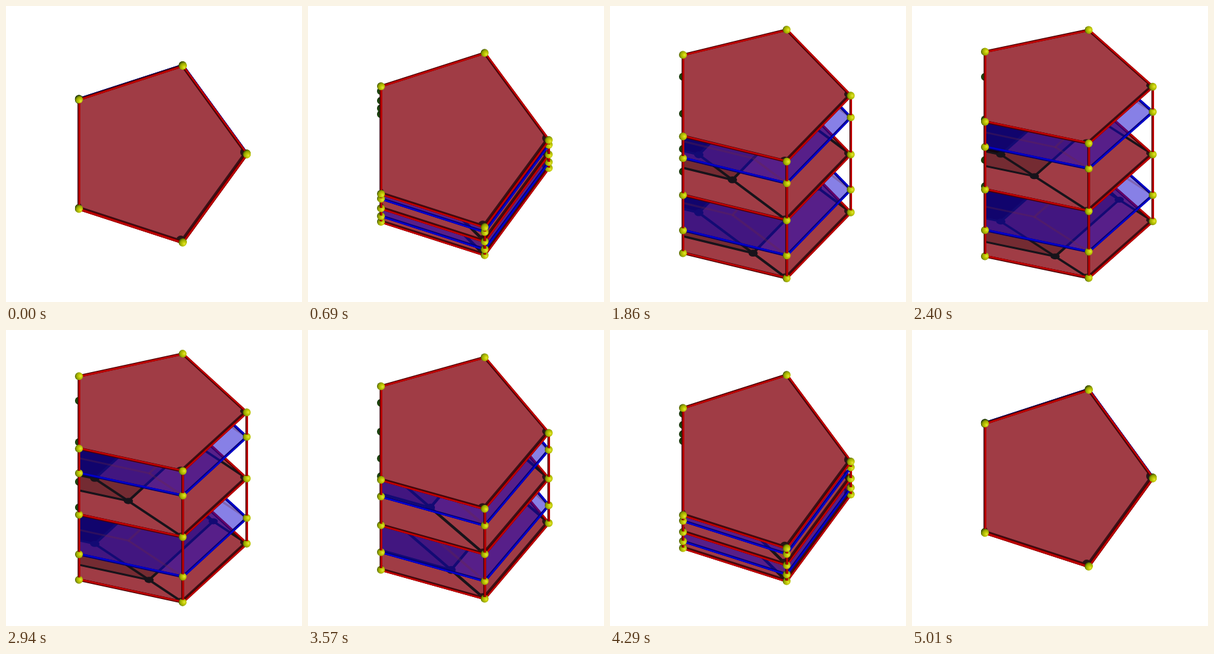
Write an HTML page with a canvas that moves like this. It is 450 px wide and 450 px high and loops after 5.04 s.

```html
<!DOCTYPE html>
<html lang="en">
<head>
<meta charset="utf-8">
<title>Tilting pentagonal prism</title>
<style>
  html, body { margin: 0; width: 100%; height: 100%; overflow: hidden; background: #fff; }
  canvas { display: block; }
</style>
</head>
<body>
<canvas id="stage" width="450" height="450"></canvas>
<script>
const ctx = document.getElementById('stage').getContext('2d');
const MID = 225, R = 141, H = 133.5, BALL = 6;
const FRAME = 30, COUNT = 168, HOLD = 12, RAMP = 60;
const MAX_TILT = 50 * Math.PI / 180;
const SHADOW = '#17131a';

// From bottom to top; dy is a small offset on the screen.
const levels = [
  { z: -1, red: true, dy: 0 },
  { z: -0.618, red: false, dy: -0.8 },
  { z: 0, red: true, dy: 0.7 },
  { z: 0.618, red: false, dy: -0.8 },
  { z: 1, red: true, dy: 0 }
];

// Back corners come first, so front posts are painted over them.
const corners = [0, 1, 2, 3, 4]
  .map(i => ({ x: R * Math.cos(i * 0.4 * Math.PI), y: R * Math.sin(i * 0.4 * Math.PI) }));
const backFirst = [4, 3, 0, 2, 1];
const BACK_LEFT = 3;

let cos = 1, sin = 0;

const clamp = v => Math.max(0, Math.min(1, v));
const levelY = l => MID - l.z * H * sin + l.dy;
const project = (c, l) => ({ x: MID + c.x, y: levelY(l) + c.y * cos });
const gap = (i, n) => (levels[i + n].z - levels[i].z) * H;

function tracePentagon(shift) {
  ctx.beginPath();
  corners.forEach(c => ctx.lineTo(c.x - shift, c.y - shift));
  ctx.closePath();
}

function fillPentagon(shift, color) {
  tracePentagon(shift);
  ctx.fillStyle = color;
  ctx.fill();
}

function strokePentagon(shift, color, width) {
  tracePentagon(shift);
  ctx.strokeStyle = color;
  ctx.lineWidth = width;
  ctx.stroke();
}

// Light comes from (1, 1, 1), so a point at height h casts to (-h, -h).
function dots(shift, color) {
  ctx.fillStyle = color;
  for (const c of corners) {
    ctx.beginPath();
    ctx.arc(c.x - shift, c.y - shift, BALL + 1, 0, 2 * Math.PI);
    ctx.fill();
  }
}

function postShadows(length, color, width) {
  ctx.strokeStyle = color;
  ctx.lineWidth = width;
  ctx.beginPath();
  for (const c of corners) {
    ctx.moveTo(c.x, c.y);
    ctx.lineTo(c.x - length, c.y - length);
  }
  ctx.stroke();
}

function drawPlane(i) {
  const level = levels[i];
  ctx.save();
  ctx.setTransform(1, 0, 0, cos, MID, levelY(level));
  fillPentagon(0, level.red ? '#a03c45' : 'rgba(16, 2, 206, 0.5)');
  tracePentagon(0);
  ctx.clip();
  if (level.red) {
    if (i < 4) {
      const near = gap(i, 1), far = gap(i, 2);
      fillPentagon(near, 'rgba(0, 0, 0, 0.28)');
      fillPentagon(far, 'rgba(8, 4, 8, 0.9)');
      strokePentagon(near, SHADOW, 4.5);
      strokePentagon(far, SHADOW, 4.5);
      postShadows(far, SHADOW, 4.5);
      dots(near, SHADOW);
      dots(far, SHADOW);
    }
    strokePentagon(2, '#3a1016', 4);
    dots(3, '#2a1418');
  } else {
    const above = gap(i, 1), faint = 'rgba(110, 40, 60, 0.3)';
    strokePentagon(above, faint, 4);
    postShadows(above, faint, 4);
  }
  ctx.restore();
}

function line(a, b, color, width) {
  ctx.strokeStyle = color;
  ctx.lineWidth = width;
  ctx.beginPath();
  ctx.moveTo(a.x, a.y);
  ctx.lineTo(b.x, b.y);
  ctx.stroke();
}

function tube(a, b, red) {
  const len = Math.hypot(b.x - a.x, b.y - a.y);
  if (len < 0.5) return;
  let nx = (a.y - b.y) / len, ny = (b.x - a.x) / len;
  const side = nx + ny * (cos - sin) < 0 ? -0.7 : 0.7;
  nx *= side;
  ny *= side;
  line(a, b, red ? '#4a0004' : '#00006e', 4);
  line({ x: a.x + nx, y: a.y + ny }, { x: b.x + nx, y: b.y + ny }, red ? '#c00000' : '#0000cd', 2.6);
}

function ball(p, dark) {
  const lx = 0.577 * BALL, ly = 0.577 * (cos - sin) * BALL;
  const g = ctx.createRadialGradient(
    p.x + lx * 0.75, p.y + ly * 0.75, 0,
    p.x + lx * 0.5, p.y + ly * 0.5, BALL * 1.5);
  const stops = dark
    ? ['#2c6416', '#265a12', '#1c480e', '#0c2406']
    : ['#e2e63c', '#c4cc04', '#94a400', '#1e3400'];
  stops.forEach((s, i) => g.addColorStop([0, 0.3, 0.65, 1][i], s));
  ctx.fillStyle = g;
  ctx.beginPath();
  ctx.arc(p.x, p.y, BALL, 0, 2 * Math.PI);
  ctx.fill();
}

function drawLevel(i) {
  const level = levels[i];
  const points = corners.map(c => project(c, level));
  drawPlane(i);
  points.forEach((p, k) => tube(p, points[(k + 1) % 5], level.red));
  for (const k of backFirst) {
    ball(points[k], k === BACK_LEFT && i < 4);
    if (i < 4) {
      const p = points[k];
      tube({ x: p.x, y: p.y - (BALL - 1) * sin }, project(corners[k], levels[i + 1]), true);
    }
  }
}

function tiltAt(ms) {
  const half = COUNT / 2;
  const frame = Math.floor(ms / FRAME) % COUNT;
  const fromStart = half - Math.abs(frame - half);
  return MAX_TILT * clamp((fromStart - HOLD) / RAMP);
}

const start = performance.now();

function draw() {
  const tilt = tiltAt(Math.max(0, performance.now() - start));
  cos = Math.cos(tilt);
  sin = Math.sin(tilt);
  ctx.fillStyle = '#fff';
  ctx.fillRect(0, 0, 450, 450);
  levels.forEach((_, i) => drawLevel(i));
  requestAnimationFrame(draw);
}
draw();
</script>
</body>
</html>
```
